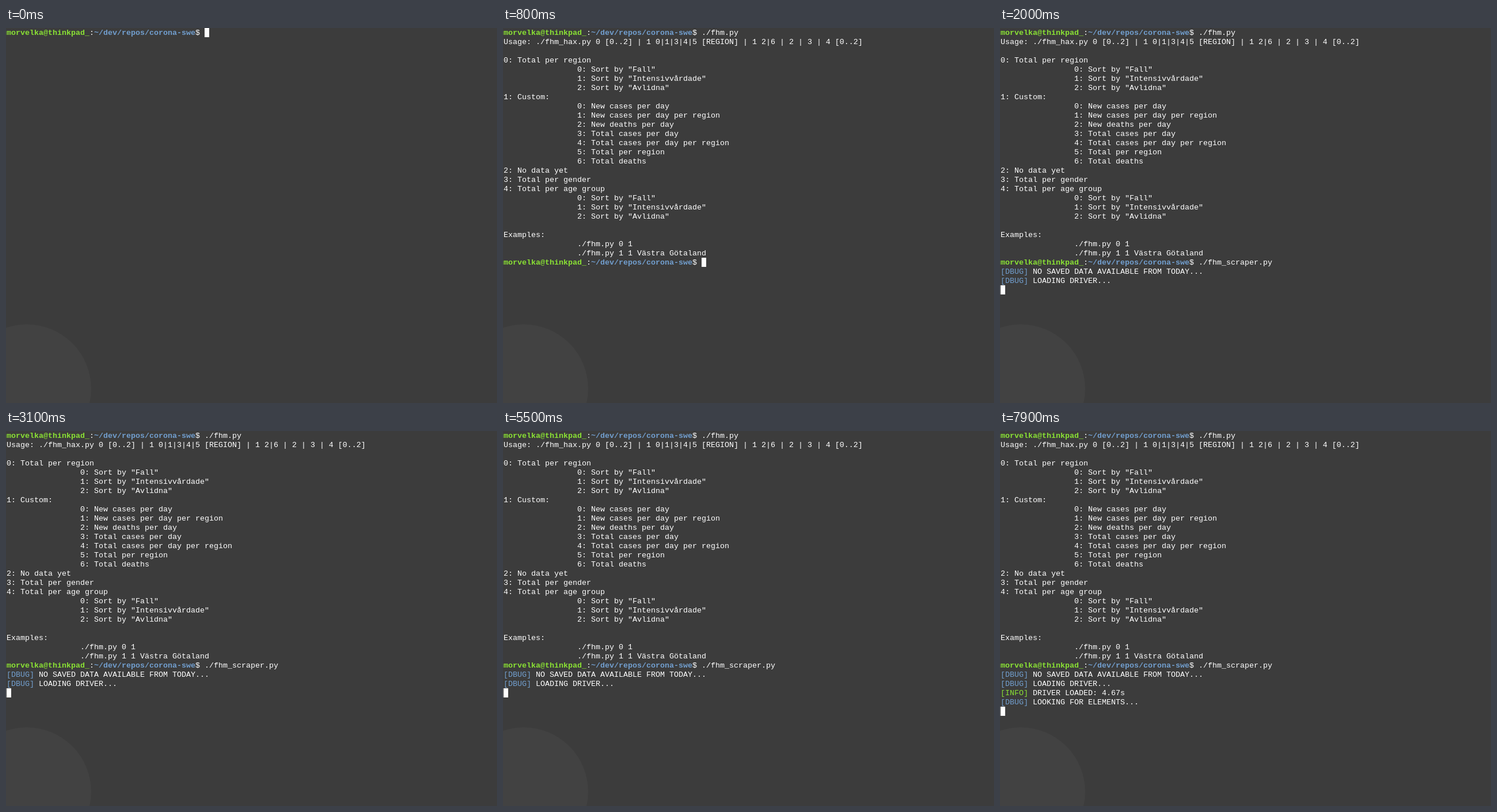
Write an HTML page that moves like this. It is 853 px wide and 653 px high and loops after 8 s.

```html
<!DOCTYPE html>
<html lang="en">
<head>
<meta charset="utf-8">
<title>Terminal session</title>
<style>
  html, body { margin: 0; width: 100%; height: 100%; overflow: hidden; background: #3c3c3c; }
  svg { display: block; }
  text {
    font: 13.333px "Liberation Mono", monospace;
    font-variant-ligatures: none;
    white-space: pre;
    fill: #fff;
  }
  .user { fill: #8ae234; font-weight: bold; }
  .path { fill: #729fcf; font-weight: bold; }
  .info { fill: #8ae234; }
  .debug { fill: #729fcf; }
</style>
</head>
<body>
<svg width="853" height="653" viewBox="0 0 853 653">
  <circle cx="36" cy="628" r="112" fill="#424242"/>
  <g id="screen"></g>
  <rect id="cursor" width="8" height="16" fill="#fff"/>
</svg>
<script>
const CELL_W = 8, CELL_H = 16, LEFT = 1, BASELINE = 12, LOOP = 8000;
const SVG_NS = "http://www.w3.org/2000/svg";
const screenEl = document.getElementById("screen");
const cursorEl = document.getElementById("cursor");

// A line is a list of [text, class] runs.
const plain = text => [[text, ""]];
const prompt = input => [
  ["morvelka@thinkpad_", "user"], [":", ""],
  ["~/dev/repos/corona-swe", "path"], ["$ " + input, ""]
];
const debug = text => [["[DBUG]", "debug"], [" " + text, ""]];
const info = text => [["[INFO]", "info"], [" " + text, ""]];

const indent = " ".repeat(16);
const numbered = items => items.map((item, i) => `${indent}${i}: ${item}`);
const sorting = numbered(["Fall", "Intensivvårdade", "Avlidna"].map(s => `Sort by "${s}"`));

const usage = [
  "Usage: ./fhm_hax.py 0 [0..2] | 1 0|1|3|4|5 [REGION] | 1 2|6 | 2 | 3 | 4 [0..2]",
  "",
  "0: Total per region",
  ...sorting,
  "1: Custom:",
  ...numbered([
    "New cases per day",
    "New cases per day per region",
    "New deaths per day",
    "Total cases per day",
    "Total cases per day per region",
    "Total per region",
    "Total deaths"
  ]),
  "2: No data yet",
  "3: Total per gender",
  "4: Total per age group",
  ...sorting,
  "",
  "Examples:",
  indent + "./fhm.py 0 1",
  indent + "./fhm.py 1 1 Västra Götaland"
].map(plain);

const blank = plain("");
const help = [prompt("./fhm.py "), ...usage];
const scraper = [...help, prompt("./fhm_scraper.py ")];
const loading = [...scraper, debug("NO SAVED DATA AVAILABLE FROM TODAY..."), debug("LOADING DRIVER...")];
const loaded = [...loading, info("DRIVER LOADED: 4.67s"), debug("LOOKING FOR ELEMENTS...")];

// [start ms, lines, cursor hidden]; the cursor sits at the end of the last line.
const steps = [
  [0, [prompt("")]],
  [100, [prompt("./f")]],
  [200, [prompt("./fhm")]],
  [300, [prompt("./fhm.py ")]],
  [700, [prompt("./fhm.py "), blank]],
  [800, [...help, prompt("")]],
  [1300, [...help, prompt("./fhm.py ")]],
  [1500, scraper],
  [1800, [...scraper, blank]],
  ...[2000, 2400, 3100, 3600, 4300, 4900, 5500, 6100, 6700]
    .map((t, i) => [t, [...loading, blank], i % 2 === 1]),
  ...[6800, 7300, 7900].map((t, i) => [t, [...loaded, blank], i % 2 === 1])
];

function drawRun(text, cls, col, row) {
  const el = document.createElementNS(SVG_NS, "text");
  el.setAttribute("x", LEFT + col * CELL_W);
  el.setAttribute("y", BASELINE + row * CELL_H);
  el.setAttribute("class", cls);
  el.textContent = text;
  screenEl.append(el);
}

function draw([, lines, hidden]) {
  screenEl.replaceChildren();
  let col = 0;
  lines.forEach((line, row) => {
    col = 0;
    for (const [text, cls] of line) {
      const pad = text.length - text.trimStart().length;
      if (text.trim()) drawRun(text.trim(), cls, col + pad, row);
      col += text.length;
    }
  });
  cursorEl.setAttribute("x", LEFT + col * CELL_W);
  cursorEl.setAttribute("y", (lines.length - 1) * CELL_H);
  cursorEl.setAttribute("visibility", hidden ? "hidden" : "visible");
}

const start = performance.now();
let shown;
function tick() {
  const time = (performance.now() - start) % LOOP;
  const step = steps.findLast(([t]) => t <= time);
  if (step !== shown) draw(shown = step);
  requestAnimationFrame(tick);
}
tick();
</script>
</body>
</html>
```
